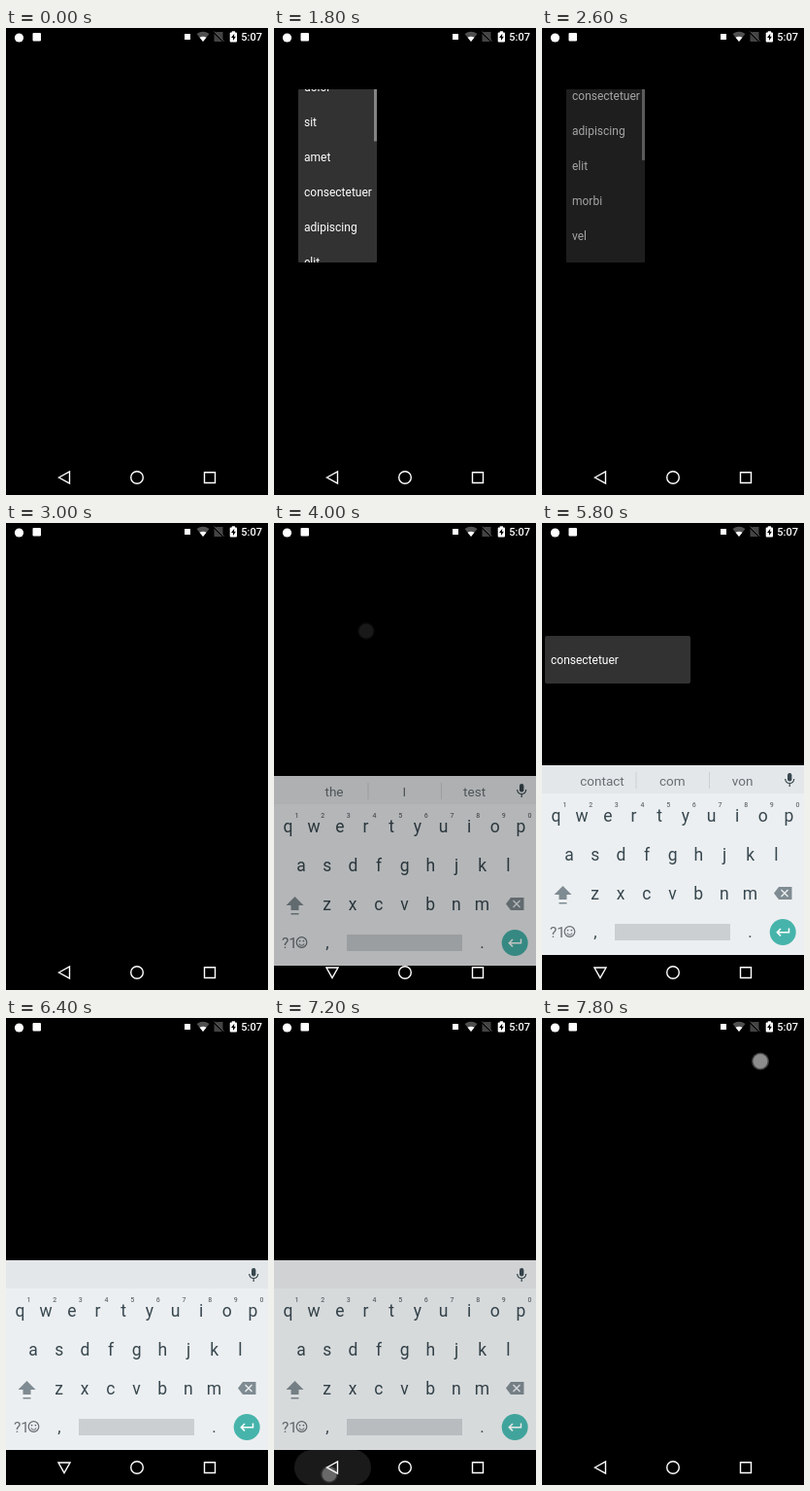
An HTML page with a canvas for the animation above (8 s loop, 270 by 480 pixels).

```html
<!DOCTYPE html>
<html lang="en">
<head>
<meta charset="utf-8">
<title>Popup list demo</title>
<style>
  html, body { margin: 0; width: 100%; height: 100%; overflow: hidden; background: #000; }
  canvas { display: block; width: 100vw; height: 100vh; }
</style>
</head>
<body>
<canvas></canvas>
<script>
const W = 270, H = 480, LOOP = 8000, STEP = 200;
const WORDS = 'lorem ipsum dolor sit amet consectetuer adipiscing elit morbi vel ligula vitae arcu aliquet mollis etiam vel erat placerat ante porttitor sodales pellentesque augue purus'.split(' ');
const ROW = 36;
const POPUP = '#323232';
const KEYS = {
  base: '#eceff1', strip: '#e4e7e9', ink: '#37474f', word: '#666e73',
  icon: '#7f8b92', space: '#cbcfd2', enter: '#46b4ab'
};

const canvas = document.querySelector('canvas');
const ctx = canvas.getContext('2d');

function text(str, x, y, size, color, align = 'center', weight = 400) {
  ctx.font = `${weight} ${size}px Roboto, sans-serif`;
  ctx.textAlign = align;
  ctx.fillStyle = color;
  ctx.fillText(str, x, y);
}

function rect(x, y, w, h, color, radius = 0) {
  ctx.beginPath();
  ctx.roundRect(x, y, w, h, radius);
  ctx.fillStyle = color;
  ctx.fill();
}

function circle(x, y, r, color) {
  ctx.beginPath();
  ctx.arc(x, y, r, 0, 7);
  ctx.fillStyle = color;
  ctx.fill();
}

function ring(x, y, r, color, width) {
  ctx.beginPath();
  ctx.arc(x, y, r, 0, 7);
  ctx.strokeStyle = color;
  ctx.lineWidth = width;
  ctx.stroke();
}

function shape(d, color) {
  ctx.fillStyle = color;
  ctx.fill(new Path2D(d));
}

function line(d, color, width) {
  ctx.strokeStyle = color;
  ctx.lineWidth = width;
  ctx.stroke(new Path2D(d));
}

function withAlpha(alpha, draw) {
  ctx.save();
  ctx.globalAlpha = alpha;
  draw();
  ctx.restore();
}

function touch(x, y, alpha) {
  withAlpha(alpha, () => {
    circle(x, y, 9, '#444');
    circle(x, y, 7.5, '#8c8c8c');
  });
}

function statusBar() {
  circle(13.5, 10, 4.6, '#fff');
  rect(27.5, 5, 8.5, 8.5, '#fff', 1);
  rect(184, 6, 6, 6, '#fff');
  shape('M196.5 6Q203 1.5 209.5 6L203 14Z', '#505050');
  shape('M199.5 9.7Q203 7.8 206.5 9.7L203 14Z', '#fff');
  shape('M214.5 6L217 4H223.5V14H214.5Z', '#444');
  line('M213.5 4L224.5 14.5', '#000', 1.5);
  line('M214.5 3.7L224.5 13.5', '#606060', 1);
  rect(230.7, 4.5, 7.3, 10, '#fff', 1);
  rect(232.8, 3.3, 3.2, 2, '#fff');
  shape('M235.3 5.8L232 10H234V13L236.9 8.8H235Z', '#000');
  text('5:07', 264, 13, 11, '#fff', 'right', 500);
}

function navBar(keyboardShown) {
  line(keyboardShown ? 'M54 457H66L60 467.5Z' : 'M54.5 462L65.5 456V468Z', '#fff', 1.4);
  ring(135, 462, 6.3, '#fff', 1.4);
  line('M204.5 456.7H215.5V467.5H204.5Z', '#fff', 1.4);
}

function listPopup(scroll, alpha) {
  const x = 25, y = 63, w = 81, h = 178;
  withAlpha(alpha, () => {
    rect(x, y, w, h, POPUP, 1);
    ctx.beginPath();
    ctx.rect(x, y, w, h);
    ctx.clip();
    WORDS.forEach((word, i) => text(word, 31, 85 + i * ROW - scroll, 12, '#fff', 'left'));
    const ratio = h / (WORDS.length * ROW);
    rect(103, y, 3, (scroll + h) * ratio, '#848484');
  });
}

function completionPopup(alpha) {
  withAlpha(alpha, () => {
    rect(3, 116, 150, 49, POPUP, 2);
    text('consectetuer', 9, 145, 12, '#fff', 'left');
  });
}

function keyRow(letters, firstX, baseline) {
  [...letters].forEach((ch, i) => text(ch, firstX + i * 26.67, baseline, 17.5, KEYS.ink));
}

function keyboard(offset, suggestions, alpha) {
  withAlpha(alpha, () => {
    ctx.translate(0, offset);
    // Cut the panel first so translucent layers blend with black only once
    rect(0, 249, W, 29, KEYS.strip);
    rect(0, 278, W, 166, KEYS.base);
    ctx.globalAlpha = Math.sqrt(alpha);

    suggestions.forEach((word, i) => text(word, 62 + i * 72.3, 269.5, 13.5, KEYS.word));
    if (suggestions.length) line('M97 256V273M172.5 256V273', KEYS.space, 1);
    rect(253, 257, 4.4, 8.5, KEYS.ink, 2.2);
    line('M250.7 263Q251 267.5 255.2 267.5Q259.4 267.5 259.7 263M255.2 267.5V271', KEYS.ink, 1.2);

    keyRow('qwertyuiop', 14.5, 306.5);
    [...'1234567890'].forEach((n, i) => text(n, 23.5 + i * 26.67, 291.5, 7, KEYS.word, 'center', 500));
    keyRow('asdfghjkl', 28, 347);
    keyRow('zxcvbnm', 54.5, 387);

    shape('M21.5 373L30.5 382H25.5V387H17.5V382H12.5ZM17.5 390H25.5V391.5H17.5Z', KEYS.icon);
    shape('M239 380.5L244 374H257.5V387H244Z', KEYS.icon);
    line('M246.5 377L253.5 384M253.5 377L246.5 384', KEYS.base, 1.4);

    text('?1', 8, 426, 15.5, KEYS.word, 'left');
    ring(28.5, 420, 5.3, KEYS.word, 1.2);
    circle(26.6, 418.6, 0.9, KEYS.word);
    circle(30.4, 418.6, 0.9, KEYS.word);
    line('M25.8 421.5Q28.5 425 31.2 421.5', KEYS.word, 1.1);
    text(',', 55, 426, 17, KEYS.ink);
    rect(75, 412, 119, 17, KEYS.space);
    text('.', 214.5, 426, 17, KEYS.ink);
    circle(248.2, 420.5, 13.5, KEYS.enter);
    line('M254.5 416.5V420.7H242.5M246 417L242.3 420.7L246 424.4', '#fff', 1.5);
  });
}

// Draws the panel opaque, then darkens it towards the black page
function fadedKeyboard(offset, suggestions, opacity) {
  keyboard(offset, suggestions, 1);
  withAlpha(1 - opacity, () => rect(0, 249 + offset, W, 195, '#000'));
}

function keyboardAt(t) {
  if (t < 4000 || t >= 7600) return;
  const words = t < 5400 ? ['the', 'I', 'test'] : t < 6200 ? ['contact', 'com', 'von'] : [];
  if (t < 4200) fadedKeyboard(11, words, 0.76);
  else if (t < 7200) fadedKeyboard(0, words, 1);
  else if (t < 7400) fadedKeyboard(0, words, 0.91);
  else fadedKeyboard(14, words, 0.5);
}

// Each tap: start time, x, y, opacity per step
const TAPS = [
  [3800, 95, 111, [0.8, 0.13]],
  [4600, 108, 381, [0.6]],
  [5000, 228, 301, [0.6]],
  [5400, 188, 381, [0.6]],
  [6000, 78, 141, [0.6]],
  [7000, 57, 469, [0.9, 0.6]],
  [7800, 225, 44.5, [1]]
];

function render(t) {
  ctx.fillStyle = '#000';
  ctx.fillRect(0, 0, W, H);
  statusBar();

  if (t >= 1400 && t < 3000) {
    const fling = 200 * (1 - Math.exp(-3.08 * Math.max(0, t - 1600) / 1000));
    const alpha = t < 1600 ? 0.6 : t < 2600 ? 1 : t < 2800 ? 0.6 : 0.2;
    listPopup(fling, alpha);
  }
  if (t >= 5200 && t < 6400) completionPopup(t < 5400 ? 0.6 : t < 6200 ? 1 : 0.4);

  keyboardAt(t);
  if (t >= 7000 && t < 7400) rect(21, 444, 79, 36, '#1a1a1a', 18);
  for (const [start, x, y, levels] of TAPS) {
    const level = levels[(t - start) / STEP];
    if (level) touch(x, y, level);
  }
  navBar(t >= 4000 && t < 7200);
}

function frame(now) {
  const scale = devicePixelRatio || 1;
  const w = Math.round(innerWidth * scale), h = Math.round(innerHeight * scale);
  if (canvas.width !== w || canvas.height !== h) {
    canvas.width = w;
    canvas.height = h;
  }
  ctx.setTransform(w / W, 0, 0, h / H, 0, 0);
  render(Math.floor(now % LOOP / STEP) * STEP);
  requestAnimationFrame(frame);
}
requestAnimationFrame(frame);
</script>
</body>
</html>
```
